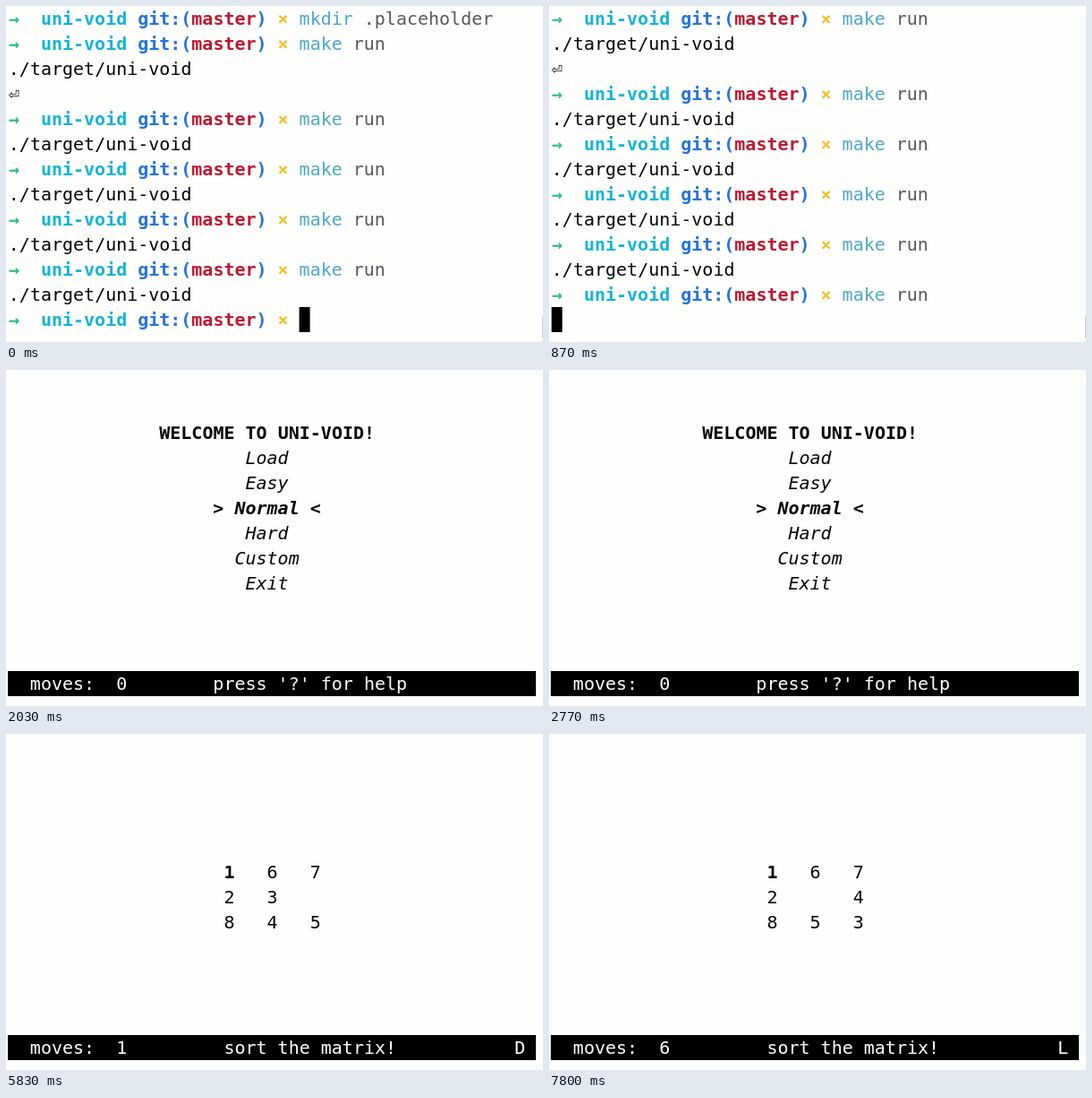
These frames come from a looping animation (600 px wide and 375 px high, 8000 ms). An HTML page with a canvas:

```html
<!DOCTYPE html>
<html lang="en">
<head>
<meta charset="utf-8">
<title>Terminal puzzle</title>
<style>
  html, body { margin: 0; width: 100%; height: 100%; overflow: hidden; background: #fefefd; }
  canvas { display: block; width: 600px; height: 375px; }
</style>
</head>
<body>
<canvas id="stage"></canvas>
<script>
const LOOP = 8000, LEFT = 2.8, CELL = 12.03, LINE = 28, BASELINE = 21;
const FONT = '20px "DejaVu Sans Mono", "DejaVu Sans", monospace';

const canvas = document.getElementById('stage');
const scale = window.devicePixelRatio || 1;
canvas.width = 600 * scale;
canvas.height = 375 * scale;
const ctx = canvas.getContext('2d');
ctx.scale(scale, scale);

function put(col, row, text, color = '#050505', style = '') {
  ctx.font = `${style} ${FONT}`;
  ctx.fillStyle = color;
  ctx.fillText(text, LEFT + col * CELL, row * LINE + BASELINE);
}

function block(x, row, width) {
  ctx.fillStyle = '#000';
  ctx.fillRect(x, row * LINE, width, LINE);
}

const cursor = (col, row) => block(LEFT + col * CELL, row, 12);

// Last entry of [time, value] pairs that has already begun.
const latest = (steps, time) => steps.filter(([start]) => start <= time).pop();

// Shell
const PROMPT = [
  [0, '→', '#2fbd85'], [3, 'uni-void', '#13b4d6'], [12, 'git:(', '#2573db'],
  [17, 'master', '#bd1830'], [23, ')', '#2573db'], [25, '×', '#f0c02c'],
];
const RUN = '$make run', OUTPUT = './target/uni-void';
const HISTORY = ['$mkdir .placeholder', RUN, OUTPUT, '⏎'];
for (let i = 0; i < 4; i++) HISTORY.push(RUN, OUTPUT);

function shellLine(line, row) {
  if (line[0] !== '$') return put(0, row, line);
  for (const [col, text, color] of PROMPT) put(col, row, text, color, 'bold');
  const [command, argument = ''] = line.slice(1).split(' ');
  put(27, row, command, '#4ea7cc');
  put(28 + command.length, row, argument, '#58595b');
}

function drawShell(time) {
  const entered = time >= 870, typed = time >= 600;
  const lines = [...HISTORY, typed ? RUN : '$'].slice(entered ? 1 : 0);
  lines.forEach(shellLine);
  cursor(entered ? 0 : typed ? 35 : 27, 12);
  ctx.fillStyle = '#ccc';
  ctx.fillRect(599, 346, 1, 25);
}

// Game
function statusBar(moves, col, message, key = '') {
  block(2, 12, 590);
  put(2, 12, 'moves:  ' + moves, '#fff');
  put(col, 12, message, '#fff');
  put(47, 12, key, '#fff');
}

const MENU = ['Load', 'Easy', 'Normal', 'Hard', 'Custom', 'Exit'];
const SELECTION = [[900, 0], [1800, 1], [2030, 2], [2170, 3], [2330, 4], [2600, 3], [2770, 2], [2930, 1]];

function drawMenu(time) {
  const selected = latest(SELECTION, time)[1];
  put(14, 2, 'WELCOME TO UNI-VOID!', undefined, 'bold');
  MENU.forEach((name, i) => {
    const col = 24 - name.length / 2, row = i + 3;
    if (i === selected) put(col - 2, row, `> ${name} <`, undefined, 'italic bold');
    else put(col, row, name, undefined, 'italic');
  });
  statusBar(0, 19, "press '?' for help");
}

const MOVES = [[5830, 'D'], [6170, 'L'], [6730, 'D'], [7500, 'R'], [7630, 'U'], [7800, 'L']];
const OFFSET = { U: -3, D: 3, L: -1, R: 1 };

function drawPuzzle(time) {
  const tiles = [...'16 237845'];
  const done = MOVES.filter(([start]) => start <= time);
  for (const [, key] of done) {
    const gap = tiles.indexOf(' '), next = gap + OFFSET[key];
    [tiles[gap], tiles[next]] = [tiles[next], ' '];
  }
  tiles.forEach((tile, i) => {
    const inPlace = +tile === i + 1;
    put(20 + i % 3 * 4, 5 + Math.floor(i / 3), tile, undefined, inPlace ? 'bold' : '');
  });
  statusBar(done.length, 20, 'sort the matrix!', done.length ? done[done.length - 1][1] : '');
}

const SCENES = [[0, drawShell], [900, drawMenu], [3200, drawPuzzle]];
const began = performance.now();

function frame() {
  const time = (performance.now() - began) % LOOP;
  ctx.fillStyle = '#fefefd';
  ctx.fillRect(0, 0, 600, 375);
  latest(SCENES, time)[1](time);
  requestAnimationFrame(frame);
}
frame();
</script>
</body>
</html>
```
